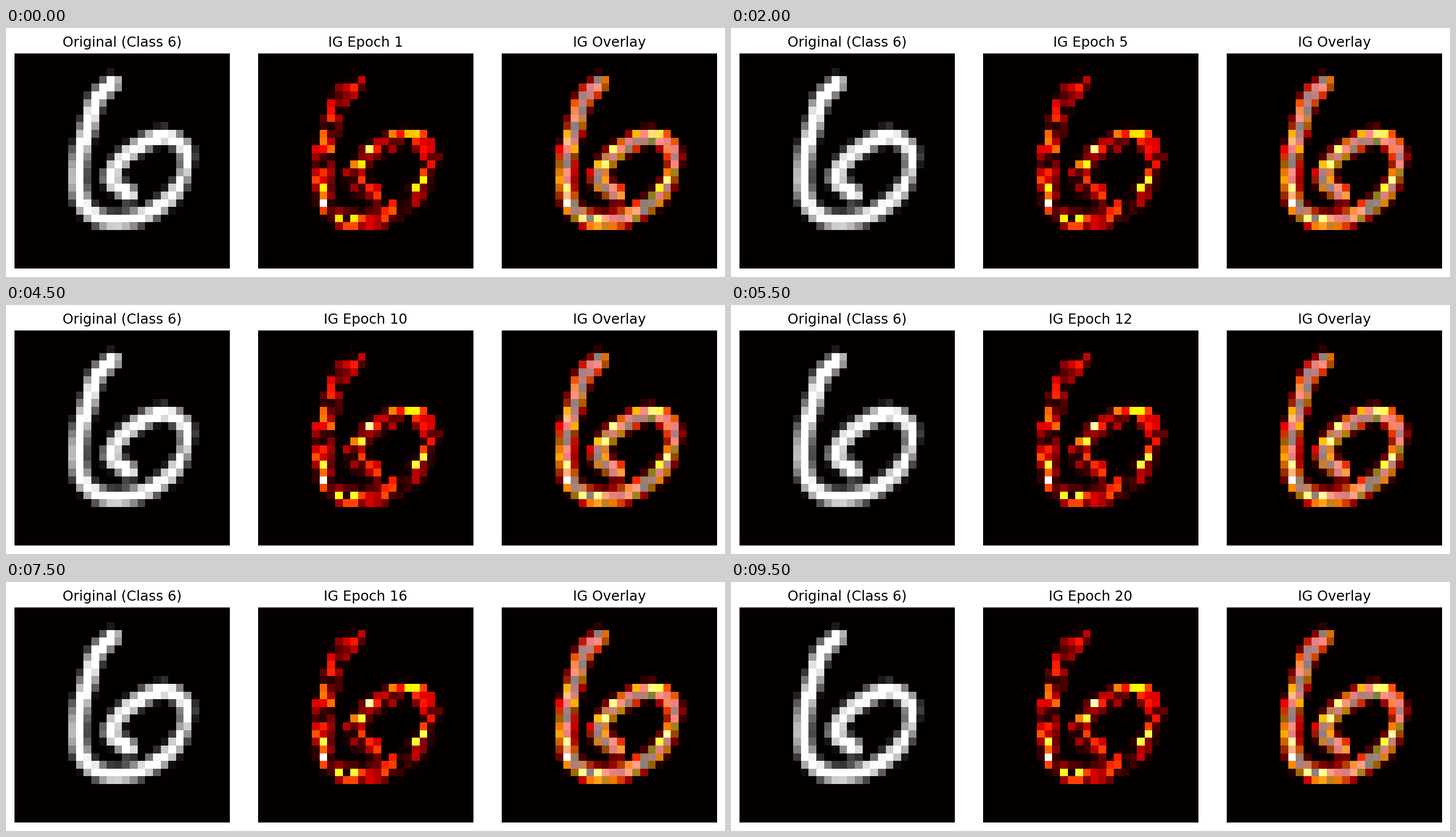
A matplotlib script that plays this animation: 1272x440 px, repeating every 10000 ms.

```python
import numpy as np
import matplotlib as mpl
import matplotlib.pyplot as plt
from matplotlib.animation import FuncAnimation

W, H, DPI = 1272, 440, 100
N = 28
EPOCHS = 20
BLACK = "#050000"

# Key points of the pen stroke, in grid cells (column, row)
STROKE = [
    (12.3, 3.4), (10.2, 5.5), (9.1, 9), (8.1, 12.5), (7.8, 16.5),
    (8.9, 19.8), (12, 21.3), (16.2, 20.6), (19.9, 18.1), (21.6, 15),
    (21.6, 11.9), (19, 10.35), (15.8, 11.5), (13, 13.9), (12.1, 16),
    (14.4, 17.8),
]

# The few strongest attributions (column, row, level)
PEAKS = [(8, 19, 1), (14, 12, .85), (21, 16, .75), (20, 17, .73),
         (13, 14, .73), (8, 17, .73), (12, 21, .72), (10, 21, .7),
         (19, 10, .66), (20, 10, .67)]


def smooth_path(points, steps=60):
    """Catmull-Rom curve through the points."""
    p = np.array(points)
    p = np.vstack([2 * p[0] - p[1], p, 2 * p[-1] - p[-2]])
    t = np.linspace(0, 1, steps)[:, None]
    parts = []
    for a, b, c, d in zip(p, p[1:], p[2:], p[3:]):
        parts.append(b + .5 * t * (c - a + t * (2 * a - 5 * b + 4 * c - d
                                                + t * (3 * (b - c) + d - a))))
    return np.vstack(parts)


def draw_digit():
    x, y = smooth_path(STROKE).T
    # the pen is lighter on the right side of the bowl
    half = 1.02 - .3 * np.exp(-((x - 21.6) ** 2 + (y - 14.8) ** 2) / 5)
    rows, cols = np.mgrid[:N, :N]
    dist = np.hypot(cols[..., None] - x, rows[..., None] - y)
    ink = np.clip((half + .52 - dist) / 1.05, 0, 1).max(axis=2)
    return np.where(ink < .04, 0, ink)


def build_heat(digit):
    rng = np.random.default_rng(6)
    heat = .66 * rng.beta(1.3, 2, (N, N)) * np.clip(digit * 1.5, 0, 1)
    drift = rng.normal(0, .02, (N, N)) * digit
    for col, row, level in PEAKS:
        heat[row, col] = level
        drift[row, col] = .08
    return heat, drift


digit = draw_digit()
empty = digit == 0
heat0, drift = build_heat(digit)


def heat_at(i):
    settle = (1 - np.exp(-i / 7)) / (1 - np.exp(-(EPOCHS - 1) / 7))
    return np.ma.array(np.clip(heat0 + drift * settle, 0, 1), mask=empty)


plt.rcParams["font.family"] = "DejaVu Sans"
fig = plt.figure(figsize=(W / DPI, H / DPI), dpi=DPI, facecolor="white")


def panel(left, title):
    ax = fig.add_axes([left / W, 15 / H, 381 / W, 380 / H])
    ax.axis("off")
    return ax, ax.set_title(title, fontsize=17.65, pad=8.8)


def show(ax, data, name, alpha=None):
    cmap = mpl.colormaps[name].with_extremes(bad=BLACK)
    return ax.imshow(data, cmap=cmap, vmin=0, vmax=1, alpha=alpha,
                     interpolation="nearest", aspect="auto")


ax_digit, _ = panel(14.5, "Original (Class 6)")
ax_heat, heat_title = panel(446, "IG Epoch 1")
ax_over, _ = panel(877, "IG Overlay")

ink = np.ma.array(digit, mask=empty)
show(ax_digit, ink, "gray")
heat_im = show(ax_heat, heat_at(0), "hot")
show(ax_over, ink, "hot")
over_im = show(ax_over, heat_at(0), "hot", alpha=.5)


def update(i):
    heat = heat_at(i)
    heat_im.set_data(heat)
    over_im.set_data(heat)
    heat_title.set_text(f"IG Epoch {i + 1}")
    return heat_im, over_im, heat_title


anim = FuncAnimation(fig, update, frames=EPOCHS, interval=500,
                     repeat=True, repeat_delay=0, blit=False)
plt.show()
```
